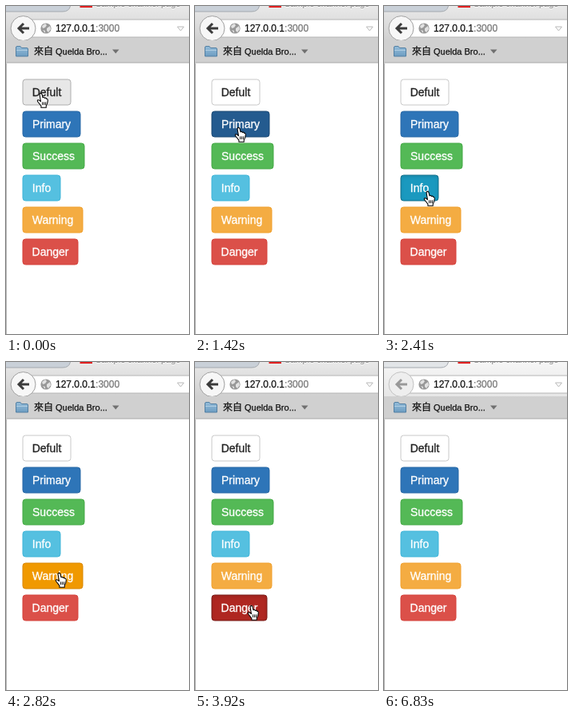
Write an HTML page that moves like this. It is 229 px wide and 411 px high and loops after 6930 ms.

```html
<!DOCTYPE html>
<html lang="en">
<head>
<meta charset="utf-8">
<title>Button states</title>
<style>
  html, body { margin: 0; width: 100%; height: 100%; overflow: hidden; background: #fff; }
  #stage { position: relative; width: 229px; height: 411px; overflow: hidden; background: #fff;
    font-family: "Liberation Sans", Arial, sans-serif; cursor: default; }
  svg { position: absolute; left: 0; top: 0; }
  /* The half-pixel offset gives the soft edges of a scaled-down screen. */
  .btn { position: absolute; left: 20px; height: 33px; box-sizing: border-box; border: 1px solid;
    border-radius: 4px; font-size: 14px; line-height: 31px; text-align: center; white-space: nowrap;
    transform: translate(.5px, .5px); -webkit-text-stroke: .3px; }
  .pressed { box-shadow: inset 0 2px 4px rgba(0, 0, 0, .1); }
  .label { fill: #111; stroke: #111; stroke-width: .25px; }
</style>
</head>
<body>
<div id="stage">
  <svg id="browser" width="229" height="411">
    <defs>
      <linearGradient id="active" x2="0" y2="1">
        <stop stop-color="#e9e9e9"/><stop offset="1" stop-color="#d0d0d0"/>
      </linearGradient>
      <linearGradient id="inactive" x2="0" y2="1">
        <stop stop-color="#f6f6f6"/><stop offset="1" stop-color="#e6e6e6"/>
      </linearGradient>
      <linearGradient id="folder" x2="0" y2="1">
        <stop stop-color="#94bcd9"/><stop offset="1" stop-color="#6d9dc2"/>
      </linearGradient>
    </defs>

    <rect id="toolbar" width="229" height="44"/>
    <path id="tab" d="M0 0H80.5Q79 7 71 7H0Z"/>
    <path d="M80.5 0Q79 7 71 7H0" fill="none" stroke="#a3a8ae"/>
    <rect x="92.5" width="15.5" height="2" fill="#e02020"/>
    <g font-size="11">
      <text x="112" y="2" fill="#fff">Sample channel page</text>
      <text x="112" y="1" fill="#888">Sample channel page</text>
    </g>

    <path d="M30 17H230V39H30Z" fill="#fff" stroke="#b4b4b4"/>
    <circle id="back" cx="21.5" cy="28" r="15.5" stroke="#a0a0a0"/>
    <path id="arrow" d="M29 28H17M22 22L16 28L22 34" fill="none" stroke-width="3"/>
    <circle cx="50" cy="28" r="6.6" fill="#989898"/>
    <path d="M45 25l4-3 2 2-2 3-3 1zM51 28l4-3 1 4-3 4-2-2zM46 30l3 1 0 3z" fill="#e2e2e2"/>
    <text class="label" x="62" y="32" font-size="12">127.0.0.1<tspan fill="#777" stroke="#777">:3000</tspan></text>
    <path d="M214.5 26H222.5L218.5 31Z" fill="none" stroke="#b8b8b8"/>

    <rect y="43" width="229" height="28" fill="#d0d0d0"/>
    <path d="M0 71H229" stroke="#a8a8a8"/>
    <path d="M12.5 63V52Q12.5 50.5 14 50.5H18L19.5 52.5H26Q27.5 52.5 27.5 54V63Z"
      fill="url(#folder)" stroke="#527fa3"/>
    <path d="M13 55.5H27" stroke="#afcde2"/>
    <text class="label" y="61" font-size="11"><tspan x="35" font-size="12"
      font-family="Noto Sans CJK TC, Noto Sans CJK, sans-serif">來自</tspan><tspan x="62">Quelda Bro...</tspan></text>
    <path d="M133 54.5H141.5L137.25 59.5Z" fill="#707070"/>
    <path d="M.5 72V411" stroke="#b4b4b4"/>
  </svg>

  <svg id="cursor" width="20" height="22" overflow="visible">
    <g id="hand" stroke="#000" stroke-linejoin="round" transform="translate(-.6 -.8) scale(1.06)">
      <path fill="#fff" d="M3.4 2.2Q4.8 0 6.2 2.2L7.2 6.2Q8.7 5.2 9.5 6.8Q11 6 11.6 7.7Q13.2 7.4 13.1 9.8L12.5 13.2
        Q12 14.8 11.2 15.7V18H5.2V16L1.7 11.6Q.2 9.6 1.5 9Q2.8 8.7 4.8 10.8Z"/>
      <path stroke-width=".9" d="M6.8 11.5V15M8.7 11.5V15M10.6 11.5V15"/>
    </g>
    <path id="pointer" d="M5 1V16L8.4 12.8L10.6 18L13 17L10.8 12H15.5Z" fill="#000" stroke="#fff"/>
  </svg>
</div>

<script>
const LOOP = 6930;
const HOTSPOT = { x: 5, y: 1 };

// Each style is [fill, border] for rest, hover and press.
const buttons = [
  ["Defult", 61, "#222", ["#fff", "#c8c8c8"], ["#e7e7e7", "#adadad"], ["#d4d4d4", "#8c8c8c"]],
  ["Primary", 73, "#fff", ["#2e75b8", "#2868a5"], ["#245b8f", "#1b4973"], ["#1c4a74", "#102940"]],
  ["Success", 78, "#fff", ["#54b956", "#45a946"], ["#3a9c3c", "#308030"], ["#33832f", "#1f561d"]],
  ["Info", 48, "#fff", ["#55c0e0", "#3fb5d8"], ["#26afd5", "#1a99bf"], ["#1a99bf", "#126c86"]],
  ["Warning", 76, "#fff", ["#f4ac42", "#f1a02c"], ["#f09900", "#d98700"], ["#d98600", "#996000"]],
  ["Danger", 70, "#fff", ["#db5049", "#d5413a"], ["#cb2d27", "#af2721"], ["#af2721", "#771a17"]]
].map(([label, width, color, ...styles], i) => {
  const el = document.createElement("div");
  const top = 91 + 40 * i;
  el.className = "btn";
  el.textContent = label;
  Object.assign(el.style, { top: top + "px", width: width + "px", color });
  stage.insertBefore(el, document.getElementById("cursor"));
  return { el, top, width, styles };
});

// Cursor stops: time, x, y
const path = [
  [0, 39, 109], [620, 39, 109], [820, 51, 137], [960, 50, 140], [1270, 50, 140],
  [1700, 49, 184], [1900, 49, 184], [2200, 50, 232], [2530, 50, 232], [2870, 63, 266],
  [3080, 63, 266], [3200, 65, 270], [3460, 65, 270], [3630, 66, 305], [3930, 66, 305],
  [4390, 176, 412]
];

const presses = [[480, 620], [1140, 1270], [1810, 1900], [2410, 2530], [3080, 3220], [3800, 3930]];

const $ = id => document.getElementById(id);
const show = (id, visible) => { $(id).style.display = visible ? "" : "none"; };

function cursorAt(t) {
  const next = path.findIndex(stop => stop[0] > t);
  if (next < 0) return null;
  const [t0, x0, y0] = path[next - 1], [t1, x1, y1] = path[next];
  const u = (t - t0) / (t1 - t0), k = u * u * (3 - 2 * u);
  return { x: x0 + (x1 - x0) * k, y: y0 + (y1 - y0) * k };
}

function drawBrowser(focused) {
  $("toolbar").setAttribute("fill", focused ? "url(#active)" : "url(#inactive)");
  $("tab").setAttribute("fill", focused ? "#c9d0d8" : "#e2e5e8");
  $("back").setAttribute("fill", focused ? "#f7f7f7" : "#eeeeee");
  $("back").setAttribute("stroke", focused ? "#a0a0a0" : "#c2c2c2");
  $("arrow").setAttribute("stroke", focused ? "#3c3c3c" : "#999");
}

function render(t) {
  drawBrowser(t < 6830);
  const pos = cursorAt(t);
  const pressed = presses.some(([from, to]) => t >= from && t < to);
  let overButton = false;

  for (const { el, top, width, styles } of buttons) {
    const x = pos ? pos.x + HOTSPOT.x - 20 : -1, y = pos ? pos.y + HOTSPOT.y - top : -1;
    const hover = x >= 0 && x < width && y >= 0 && y < 34;
    const [fill, border] = styles[hover ? (pressed ? 2 : 1) : 0];
    el.style.backgroundColor = fill;
    el.style.borderColor = border;
    el.classList.toggle("pressed", hover && pressed);
    overButton ||= hover;
  }

  show("cursor", pos);
  if (pos) $("cursor").style.transform = `translate(${Math.round(pos.x)}px, ${Math.round(pos.y)}px)`;
  show("hand", overButton);
  show("pointer", !overButton);
}

const start = performance.now();
function tick() {
  render((performance.now() - start) % LOOP);
  requestAnimationFrame(tick);
}
tick();
</script>
</body>
</html>
```
